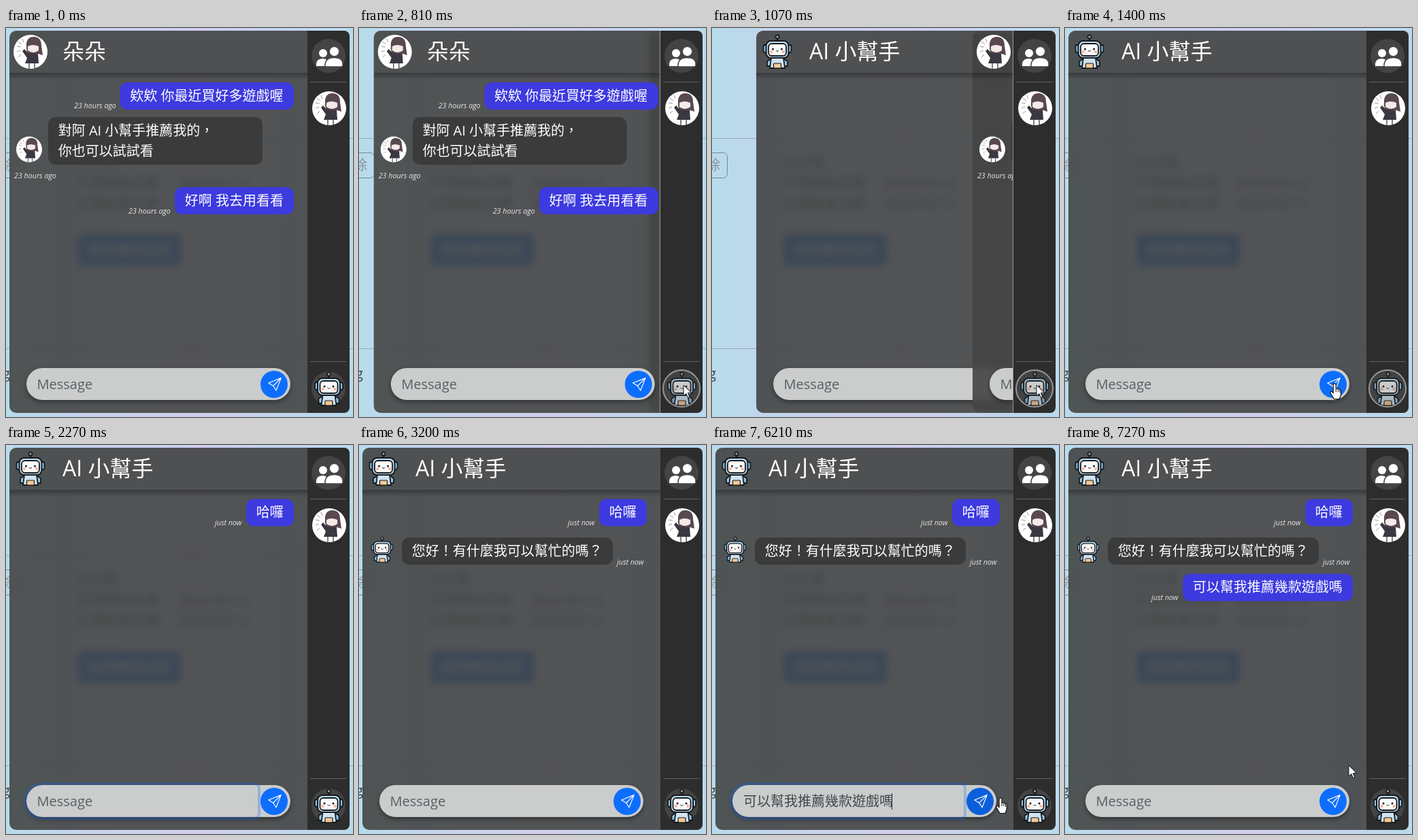
Animation, 510 px wide and 572 px high, one loop 8 s. Source, as an HTML page with a canvas:

```html
<!DOCTYPE html>
<html lang="zh-Hant">
<head>
<meta charset="utf-8">
<title>Chat panel</title>
<style>
html, body { margin: 0; width: 510px; height: 572px; overflow: hidden; }
canvas { display: block; }
</style>
</head>
<body>
<canvas id="stage" width="510" height="572"></canvas>
<script>
const W = 510, H = 572, LOOP = 8000;
const SWAP = { from: 764, to: 1164 }, PANEL_W = 438;
const FONT = '"Open Sans", "Noto Sans CJK TC", sans-serif';
const ctx = document.getElementById('stage').getContext('2d');

const clamp = v => Math.max(0, Math.min(1, v));
const ramp = (t, a, b) => clamp((t - a) / (b - a));
const pulse = (t, on, off, d = 150) => ramp(t, on, on + d) - ramp(t, off, off + d);
const easeInOut = u => u * u * (3 - 2 * u);

function box(c, x, y, w, h, r, fill, stroke, lw = 1) {
  c.beginPath();
  c.roundRect(x, y, w, h, r);
  paint(c, fill, stroke, lw);
}
function disc(c, x, y, r, fill, stroke, lw = 1) {
  c.beginPath();
  c.arc(x, y, r, 0, 7);
  paint(c, fill, stroke, lw);
}
function poly(c, pts, fill, stroke, lw = 1) {
  c.beginPath();
  for (let i = 0; i < pts.length; i += 2) c.lineTo(pts[i], pts[i + 1]);
  c.closePath();
  paint(c, fill, stroke, lw);
}
function shape(c, d, fill, stroke, lw = 1) {
  const p = new Path2D(d);
  if (fill) { c.fillStyle = fill; c.fill(p); }
  if (stroke) { c.strokeStyle = stroke; c.lineWidth = lw; c.stroke(p); }
}
function paint(c, fill, stroke, lw) {
  if (fill) { c.fillStyle = fill; c.fill(); }
  if (stroke) { c.strokeStyle = stroke; c.lineWidth = lw; c.stroke(); }
}
function text(c, s, x, y, size, color, style = '400') {
  c.font = `${style} ${size}px ${FONT}`;
  c.fillStyle = color;
  c.fillText(s, x, y);
}
function at(x, y, scale, draw) {
  ctx.save();
  ctx.translate(x, y);
  ctx.scale(scale, scale);
  draw();
  ctx.restore();
}
function layer(draw) {
  const cv = document.createElement('canvas');
  cv.width = W;
  cv.height = H;
  draw(cv.getContext('2d'));
  return cv;
}

const page = layer(c => {
  const g = c.createLinearGradient(0, 0, W, 0);
  g.addColorStop(0, '#b7dcec');
  g.addColorStop(.22, '#c6d3ee');
  g.addColorStop(.55, '#d0cfee');
  g.addColorStop(1, '#b9daed');
  c.fillStyle = g;
  c.fillRect(0, 0, W, H);
  c.fillStyle = '#9aa6b8';
  c.fillRect(0, 162, W, 1);
  c.fillRect(0, 471, W, 1);
  box(c, -60, 183.5, 82.5, 37, 6, null, '#7b858f');
  text(c, '刪除', -28, 209, 20, '#8a939c');
  const ink = '#3a4046';
  text(c, '已訂閱', 105, 205, 20, ink);
  text(c, '訂閱開始日期', 105, 235, 20, ink);
  text(c, '訂閱結束日期', 105, 265, 20, ink);
  text(c, '2024/05/12', 252, 235, 20, ink);
  text(c, '2024/06/12', 252, 265, 20, ink);
  box(c, 105, 303, 152, 47, 7, '#0d6efd');
  text(c, '檢視購買紀錄', 121, 334, 20, '#fff');
  text(c, 'g', -5, 515, 20, ink);
});

// 50 x 50 figure, centred on the origin
function robot() {
  const line = '#17191d', blue = '#8fc3e2';
  ctx.lineJoin = 'round';
  shape(ctx, 'M0 -20V-15', null, line, 2.4);
  disc(ctx, 0, -22, 2.6, '#8d979f', line, 1.6);
  box(ctx, -20.5, -10, 6, 11, 2.5, blue, line, 1.8);
  box(ctx, 14.5, -10, 6, 11, 2.5, blue, line, 1.8);
  shape(ctx, 'M-9 10L-15 14V21H-10M9 10L15 14V21H10', blue, line, 1.8);
  shape(ctx, 'M-9 9H9L11 24H-11Z', '#cfe3f1', line, 1.8);
  box(ctx, -5.5, 17, 11, 7, 1, '#f5c894', line, 1.2);
  box(ctx, -16.5, -16, 33, 25, 7, '#b9dcf0', line, 2);
  box(ctx, -13, -12, 26, 18, 5, '#fbfbfb', line, 1.8);
  disc(ctx, -6.5, -4, 1.5, line);
  disc(ctx, 6.5, -4, 1.5, line);
  disc(ctx, -9, 0, 2.2, '#f8b8a6');
  disc(ctx, 9, 0, 2.2, '#f8b8a6');
  shape(ctx, 'M-2 -2Q0 1 2 -2', null, line, 1);
}

function portrait() {
  disc(ctx, 0, 0, 25, '#fff');
  ctx.save();
  ctx.clip();
  shape(ctx, 'M-6 -13Q-4 -23 6 -22Q16 -21 16 -9L18 5L12 3H-4L-6 -4Z', '#5a484f');
  shape(ctx, 'M-4 -8Q3 -12 12 -8V-2Q4 4 -4 -2Z', '#f4ebe8');
  shape(ctx, 'M-3 2L-9 -4L-12 -1L-5 9L-8 17H12L11 3Z', '#3b3841');
  shape(ctx, 'M-2 17V25M6 17V25', null, '#55505a', 1.5);
  shape(ctx, 'M-20 -8L-14 -7M-18 -15L-13 -11M-12 -19L-10 -14M-20 0L-15 -2M-18 8L-14 4', null, '#9a9698', 1);
  ctx.restore();
}

function bubble(x, y, w, h, color, lines) {
  box(ctx, x, y, w, h, 11, color);
  lines.forEach((s, i) => text(ctx, s, x + 14.7, y + 26.5 + i * 30, 20, '#fff'));
}
const mine = (x, y, s) => bubble(x, y, 423 - x, 40, '#3d3adf', [s]);
const stamp = (s, x, y) => text(ctx, s, x, y, 10.7, '#e6e6e6', 'italic 400');

function friendChat() {
  at(36, 35, 1, portrait);
  text(ctx, '朵朵', 83, 46, 32, '#fff');
  mine(167.5, 80, '欸欸 你最近買好多遊戲喔');
  stamp('23 hours ago', 100, 118);
  at(34, 178.5, .76, portrait);
  bubble(62, 131, 315, 70, '#3b3b3b', ['對阿 AI 小幫手推薦我的，', '你也可以試試看']);
  stamp('23 hours ago', 12, 221);
  mine(248, 234, '好啊 我去用看看');
  stamp('23 hours ago', 180, 273);
}

function helperChat(t) {
  at(36, 35, 1, robot);
  text(ctx, 'AI 小幫手', 83, 46, 32, '#fff');
  if (t >= 2270) {
    mine(353, 79.5, '哈囉');
    stamp('just now', 307, 118);
  }
  if (t >= 3200) {
    at(34, 154, .76, robot);
    bubble(63, 136, 310, 40, '#3b3b3b', ['您好！有什麼我可以幫忙的嗎？']);
    stamp('just now', 379, 176);
  }
  if (t >= 6410) {
    mine(173, 189.5, '可以幫我推薦幾款遊戲嗎');
    stamp('just now', 127, 228);
  }
}

const DRAFTS = [
  { s: '哈囉', from: 1650, to: 2140, sent: 2270 },
  { s: '可以幫我推薦幾款遊戲嗎', from: 5640, to: 6100, sent: 6410 }
];

function inputBar(t) {
  ctx.save();
  ctx.shadowColor = 'rgba(0,0,0,.4)';
  ctx.shadowBlur = 7;
  ctx.shadowOffsetY = 3;
  box(ctx, 30, 500, 388, 47, 23.5, '#cbcccc');
  ctx.restore();

  const focus = pulse(t, 1540, 2400) + pulse(t, 5540, 6450);
  if (focus > 0) {
    ctx.beginPath();
    ctx.roundRect(26, 496, 348, 55, [27.5, 8, 8, 27.5]);
    ctx.roundRect(30, 500, 340, 47, [23.5, 5, 5, 23.5]);
    ctx.fillStyle = `rgba(13,110,253,${.28 * focus})`;
    ctx.fill('evenodd');
  }

  const draft = DRAFTS.find(d => t >= d.from && t < d.sent);
  if (draft) {
    const n = Math.ceil(draft.s.length * ramp(t, draft.from, draft.to));
    const s = draft.s.slice(0, n);
    text(ctx, s, 46, 531, 20, '#43474c');
    ctx.fillStyle = '#202327';
    ctx.fillRect(Math.round(45.5 + ctx.measureText(s).width) - 1, 512, 1, 24);
  } else {
    text(ctx, 'Message', 45.5, 531, 20, '#5b6066');
  }

  const hover = pulse(t, 1400, 1480) + pulse(t, 6040, 6200) + pulse(t, 6350, 7120);
  disc(ctx, 394, 524, 20, `rgb(${13 - 2 * hover},${110 - 16 * hover},${253 - 38 * hover})`);
  at(385, 514, 1.25, () => {
    ctx.lineJoin = 'round';
    shape(ctx, 'M15.4 .5L.7 6.4L6.2 9.8L9.6 15.2ZM6.2 9.8L15.4 .5', null, '#fff', .95);
  });
}

// Frosted glass: blurs whatever is already drawn beneath it
function panel(t, dx, chat) {
  if (dx >= PANEL_W) return;
  ctx.save();
  ctx.beginPath();
  ctx.rect(0, 0, 443, H);
  ctx.clip();
  ctx.beginPath();
  ctx.roundRect(5 + dx, 4, PANEL_W, 562, [10, 0, 0, 10]);
  ctx.clip();
  ctx.filter = 'blur(5px)';
  ctx.drawImage(ctx.canvas, 0, 0);
  ctx.filter = 'none';
  ctx.fillStyle = 'rgba(67,68,67,.89)';
  ctx.fillRect(0, 0, W, H);

  ctx.translate(dx, 0);
  ctx.fillStyle = 'rgba(0,0,0,.03)';
  ctx.fillRect(5, 4, PANEL_W, 62);
  const shade = ctx.createLinearGradient(0, 66, 0, 76);
  shade.addColorStop(0, 'rgba(0,0,0,.3)');
  shade.addColorStop(1, 'rgba(0,0,0,0)');
  ctx.fillStyle = shade;
  ctx.fillRect(5, 66, PANEL_W, 10);
  chat(t);
  inputBar(t);
  ctx.restore();
}

function sidebar(t, moving) {
  box(ctx, 443, 4, 62, 562, [0, 8, 8, 0], '#2d2d2d');
  if (moving) {
    ctx.fillStyle = '#8c96a4';
    ctx.fillRect(442, 4, 1, 562);
  }
  ctx.fillStyle = '#626262';
  ctx.fillRect(447, 79, 53, 1);
  ctx.fillRect(447, 490, 53, 1);

  const bg = '#444';
  disc(ctx, 474, 41, 25, bg);
  disc(ctx, 466, 37, 6, '#fff');
  shape(ctx, 'M456 56Q455 45 466 45Q474 45 474 56Z', '#fff');
  disc(ctx, 482.5, 34.5, 7, '#fff', bg, 1);
  shape(ctx, 'M469 57Q468 43.5 482.5 43.5Q496 43.5 495 55Q495 57 492 57Z', '#fff', bg, 1.5);

  at(475, 118, 1, portrait);

  const hover = pulse(t, 690, 1410, 90);
  disc(ctx, 474, 530, 25 + 2 * hover, bg);
  at(474.5, 531, 1, robot);
  if (hover > 0) {
    disc(ctx, 474, 530, 27, `rgba(60,60,60,${.25 * hover})`, `rgba(150,150,150,${hover})`, 2);
  }
}

// time, x, y, kind: a arrow, h hand, i text beam, - hidden
const PATH = [
  [0, 0, 0, '-'], [70, 509, 567, 'a'], [140, 0, 0, '-'],
  [470, 492, 546, 'a'], [690, 477, 525, 'a'], [1390, 477, 525, 'a'],
  [1400, 396.5, 523, 'h'], [1470, 380, 523, 'i'], [1540, 300, 523, 'i'], [1650, 0, 0, '-'],
  [5270, -6, 400, 'a'], [5410, 331, 478, 'a'], [5480, 336, 500, 'a'],
  [5500, 338, 522, 'i'], [5640, 0, 0, '-'],
  [6100, 398, 524, 'h'], [6200, 424, 519, 'h'], [6330, 424, 519, 'h'],
  [6400, 406, 522, 'h'], [7070, 406, 522, 'h'], [7140, 411, 500, 'a'], [7270, 417, 471, 'a']
];

function cursor(t) {
  const i = PATH.findLastIndex(k => t >= k[0]);
  const [t0, x0, y0, kind] = PATH[i];
  if (kind === '-') return;
  const next = PATH[i + 1];
  let x = x0, y = y0;
  if (next && next[3] !== '-') {
    const u = ramp(t, t0, next[0]);
    x += (next[1] - x0) * u;
    y += (next[2] - y0) * u;
  }
  at(x, y, 1, () => {
    ctx.lineJoin = 'round';
    if (kind === 'a') {
      poly(ctx, [0, 0, 0, 16, 3.8, 12.5, 6.4, 18.5, 8.8, 17.5, 6.3, 11.7, 11.5, 11.5], '#fff', '#111');
    } else if (kind === 'h') {
      poly(ctx, [-2, 1, 0, -.5, 2, 1, 2, 7, 5, 7.2, 8, 8.5, 9.5, 10.5, 9, 17, 7, 22.5,
        -1, 22.5, -3, 19, -6, 14, -6, 11.5, -4, 11.5, -2, 14], '#fff', '#111', 1.2);
      shape(ctx, 'M2 7V12M5 8V12M7.5 9V13', null, '#111');
    } else {
      shape(ctx, 'M-3 -8.5H3M0 -8.5V8.5M-3 8.5H3', null, '#111');
    }
  });
}

function draw(t) {
  ctx.drawImage(page, 0, 0);
  // One chat slides out over the other sliding in
  const swap = easeInOut(ramp(t, SWAP.from, SWAP.to));
  panel(t, PANEL_W * (1 - swap), helperChat);
  panel(t, PANEL_W * swap, friendChat);
  sidebar(t, swap > 0 && swap < 1);
  cursor(t);
}

const start = performance.now();
function tick() {
  draw((performance.now() - start) % LOOP);
  requestAnimationFrame(tick);
}
tick();
</script>
</body>
</html>
```
